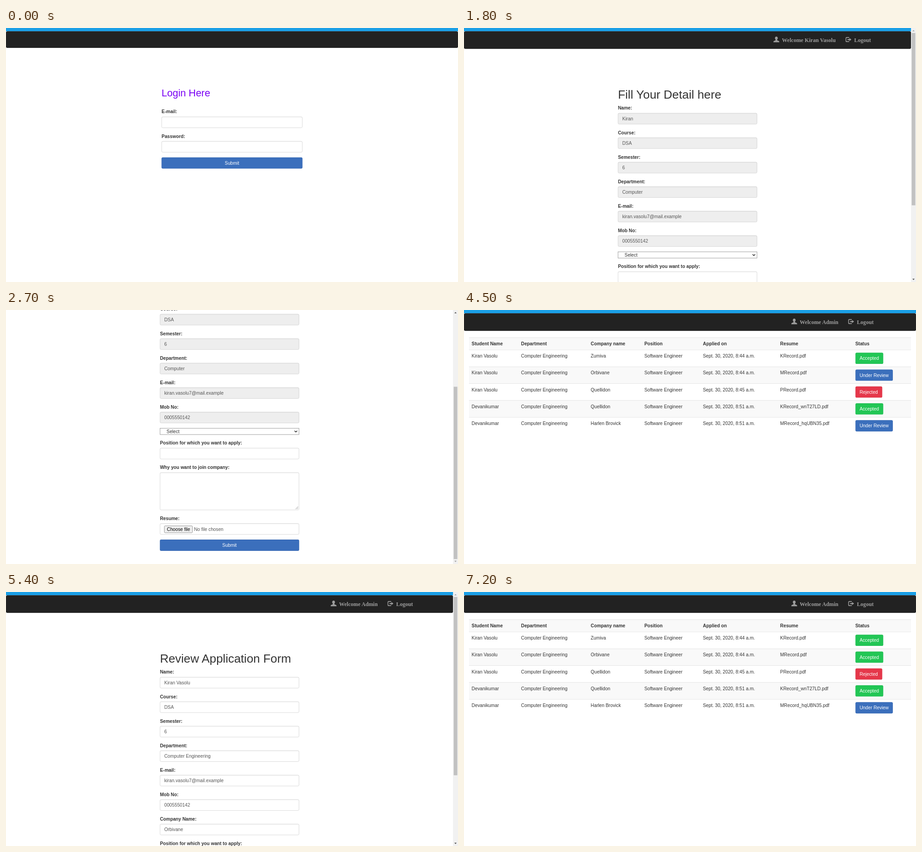
Write an HTML page that moves like this. It is 998 by 561 pixels and loops after 8000 ms.

```html
<!DOCTYPE html>
<html lang="en">
<head>
<meta charset="utf-8">
<title>Placement portal</title>
<style>
* { box-sizing: border-box; }
html, body { margin: 0; width: 998px; height: 561px; overflow: hidden; background: #fff; }
#stage {
  position: relative; width: 1366px; height: 768px; overflow: hidden;
  transform: scale(.7306); transform-origin: 0 0;
  font: 14px/20px "Liberation Sans", Arial, sans-serif; color: #333;
}
.page {
  position: absolute; inset: 0; overflow: hidden; background: #fff; visibility: hidden;
  animation: show 8s step-end infinite;
  animation-delay: calc(var(--i) * .9s - 8s);
}
.page:first-child { z-index: 1; }
@keyframes show {
  0% { visibility: visible; }
  11.25%, 100% { visibility: hidden; }
}
.doc { position: absolute; left: 0; top: 0; width: 1366px; height: 1100px; }
.long .doc { width: 1351px; }
.strip { height: 10px; background: #1a9fe6; }
nav {
  display: flex; justify-content: flex-end; align-items: center; gap: 30px;
  height: 53px; padding-right: 127px; background: #222; color: #9d9d9d;
  border: 1px solid #080808; border-radius: 4px;
  font: bold 16.6px/23px "Liberation Serif", "Times New Roman", serif;
}
.long nav { padding-right: 120px; }
nav.empty { height: 50px; }
nav span { display: flex; align-items: center; gap: 8px; white-space: nowrap; }
nav svg { width: 18px; height: 18px; fill: currentColor; margin-top: -3px; }
nav .hot { color: #fff; }

.form { position: absolute; left: 465.3px; top: 182.4px; width: 420.4px; }
.login { left: 470.3px; top: 180px; width: 425.4px; }
h1, h2 { margin: 0; font-weight: 500; white-space: nowrap; }
h1 { font: 36px/39.6px "Liberation Sans", Arial, sans-serif; margin-bottom: 10px; }
h2 { font: 30px/33px "Liberation Sans", Arial, sans-serif; margin-bottom: 30px; color: #7a00f4; }
label { display: block; height: 20px; margin-bottom: 5px; font-weight: bold; }
.field {
  position: relative; height: 34px; margin-bottom: 15px; padding: 6px 12px;
  color: #555; background: #fff; border: 1px solid #ccc; border-radius: 4px;
  box-shadow: inset 0 1px 1px rgba(0,0,0,.075); white-space: nowrap;
}
.off { background: #eee; }
.area { height: 114px; }
.area svg { position: absolute; right: 1px; bottom: 1px; width: 10px; height: 10px; }
.pick {
  position: relative; height: 20px; margin-bottom: 15px; padding-left: 19px;
  border: 1px solid #767676; line-height: 18px;
}
.pick svg { position: absolute; right: 4px; top: 5px; width: 10px; height: 8px; }
.pick path, .area path { fill: none; stroke: #222; stroke-width: 2; }
.area path { stroke: #777; stroke-width: 1; }
.file b {
  display: inline-block; height: 22px; margin-right: 4px; padding: 0 7px;
  font-weight: normal; line-height: 20px; color: #000;
  background: #efefef; border: 1px solid #767676; border-radius: 3px;
}
.btn {
  display: inline-block; height: 34px; padding: 7px 13px; color: #fff;
  border-radius: 4px; text-align: center; vertical-align: top; white-space: nowrap;
  background: #3b6fbc; box-shadow: inset 0 0 0 1px rgba(0,0,40,.08);
}
.wide { display: block; }
.good { background: #22c655; }
.bad { background: #e5374a; }
.btn + .btn { margin-left: 5px; }

.row { position: absolute; left: 15px; width: 1336px; height: 51px; border-top: 1px solid #ddd; }
.row:nth-child(odd) { background: #f9f9f9; }
.row.head { height: 37px; font-weight: bold; }
.row > span { position: absolute; top: 8px; white-space: nowrap; }

.bar { position: absolute; right: 0; top: 0; width: 15px; height: 768px; background: #f1f1f1; }
.bar i { position: absolute; left: 2px; width: 11px; background: #c1c1c1; }
.bar svg { position: absolute; inset: 0; width: 15px; height: 768px; }
.bubble {
  position: absolute; left: 0; bottom: 0; width: 173px; height: 23px; padding-left: 5px;
  background: #dfe1e5; border-top-right-radius: 4px; color: #4c5057;
  font: 13.5px/22px "Open Sans", "Noto Sans", sans-serif; white-space: nowrap;
}
</style>
</head>
<body>
<div id="stage"></div>
<script>
const student = "Kiran Vasolu", mail = "kiran.vasolu7@mail.example", phone = "0005550142";
const VIEW = 768;

const userIcon = `<svg viewBox="0 0 18 18"><path d="M9 0C6.300 0 4.800 2 4.800 4.600c0 2 .8 3.700 2 4.700v1.600L1.500 13.300Q0 14 0 15.500V17h18v-1.500q0-1.500-1.500-2.200l-5.300-2.400V9.300c1.200-1 2-2.700 2-4.700C13.200 2 11.700 0 9 0z"/></svg>`;
const exitIcon = `<svg viewBox="0 0 18 18"><path d="M11 1.500H4Q0 1.500 0 5.500v7q0 4 4 4h7v-2.300H4.300q-2 0-2-2V5.800q0-2 2-2H11zM11.500 4.500v3H6v3h5.500v3L18 9z"/></svg>`;

const nav = (user, hot) => `<div class="strip"></div>` + (user
  ? `<nav><span>${userIcon}Welcome ${user}</span><span class="${hot ? "hot" : ""}">${exitIcon}Logout</span></nav>`
  : `<nav class="empty"></nav>`);

const field = (name, value = "", cls = "") =>
  `<label>${name}:</label><div class="field ${cls}">${value}</div>`;
const btn = (text, cls = "") => `<span class="btn ${cls}">${text}</span>`;
const grip = `<svg viewBox="0 0 10 10"><path d="M1 9L9 1M5 9L9 5"/></svg>`;

const details = (name, dept, cls) =>
  [["Name", name], ["Course", "DSA"], ["Semester", "6"], ["Department", dept],
   ["E-mail", mail], ["Mob No", phone]].map(([k, v]) => field(k, v, cls)).join("");

const login = nav() + `<div class="form login"><h2>Login Here</h2>${
  field("E-mail")}${field("Password")}${btn("Submit", "wide")}</div>`;

const apply = hot => nav(student, hot) + `<div class="form"><h1>Fill Your Detail here</h1>${
  details(student.split(" ")[0], "Computer", "off")
  }<div class="pick">Select<svg viewBox="0 0 10 8"><path d="M1 2l4 4 4-4"/></svg></div>${
  field("Position for which you want to apply")}${
  field("Why you want to join company", grip, "area")}${
  field("Resume", "<b>Choose file</b>No file chosen", "file")}${btn("Submit", "wide")}</div>`;

const review = nav("Admin") + `<div class="form"><h1>Review Application Form</h1>${
  details(student, "Computer Engineering", "")}${field("Company Name", "Orbivane")}${
  field("Position for which you want to apply", "Software Engineer")}${
  field("Why you want to join company", grip, "area")}${
  btn("Accept", "good")}${btn("Reject", "bad")}</div>`;

const cols = [8, 157.500, 368, 530, 707, 940.500, 1167.500];
const row = (cells, top, cls = "") => `<div class="row ${cls}" style="top:${top}px">${
  cells.map((c, i) => `<span style="left:${cols[i]}px">${c}</span>`).join("")}</div>`;

const good = btn("Accepted", "good"), bad = btn("Rejected", "bad"), wait = btn("Under Review");
const entries = [
  [student, "Zumiva", "44", "KRecord", good],
  [student, "Orbivane", "44", "MRecord", good],
  [student, "Quellidon", "45", "PRecord", bad],
  ["Devanikumar", "Quellidon", "51", "KRecord_wnT27LD", good],
  ["Devanikumar", "Harlen Brovick", "51", "MRecord_hqUBN35", wait]
];
const table = (user, list, pending) => nav(user) + "<div>" +
  row(["Student Name", "Department", "Company name", "Position", "Applied on", "Resume", "Status"], 83, "head") +
  list.map(([who, firm, min, doc, status], i) => row(
    [who, "Computer Engineering", firm, "Software Engineer", `Sept. 30, 2020, 8:${min} a.m.`,
     doc + ".pdf", pending && i === 1 ? wait : status], 120 + 51 * i)).join("") + "</div>";

function scrollbar(height, y) {
  const track = VIEW - 30, end = y >= height - VIEW;
  const shade = off => off ? "#a3a3a3" : "#505050";
  return `<div class="bar"><i style="top:${15 + track * y / height}px;height:${track * VIEW / height}px"></i>
    <svg viewBox="0 0 15 768"><path fill="${shade(!y)}" d="M4 10l3.500-4 3.500 4z"/>
    <path fill="${shade(end)}" d="M4 758l3.500 4 3.500-4z"/></svg></div>`;
}

const page = (html, height = VIEW, y = 0, extra = "") => ({ html, height, y, extra });
const bubble = `<div class="bubble">mysite.test:80/signout/</div>`;
const pages = [
  page(login),
  page(table(student, entries.slice(0, 3), true)),
  page(apply(), 1087),
  page(apply(), 1087, 319),
  page(apply(true), 1087, 0, bubble),
  page(table("Admin", entries, true)),
  page(review, 1052),
  page(review, 1052, 284),
  page(table("Admin", entries))
];

document.getElementById("stage").innerHTML = pages.map((p, i) => {
  const long = p.height > VIEW;
  return `<section class="page ${long ? "long" : ""}" style="--i:${i}">
    <div class="doc" style="top:${-p.y}px">${p.html}</div>${
    long ? scrollbar(p.height, p.y) : ""}${p.extra}</section>`;
}).join("");
</script>
</body>
</html>
```
